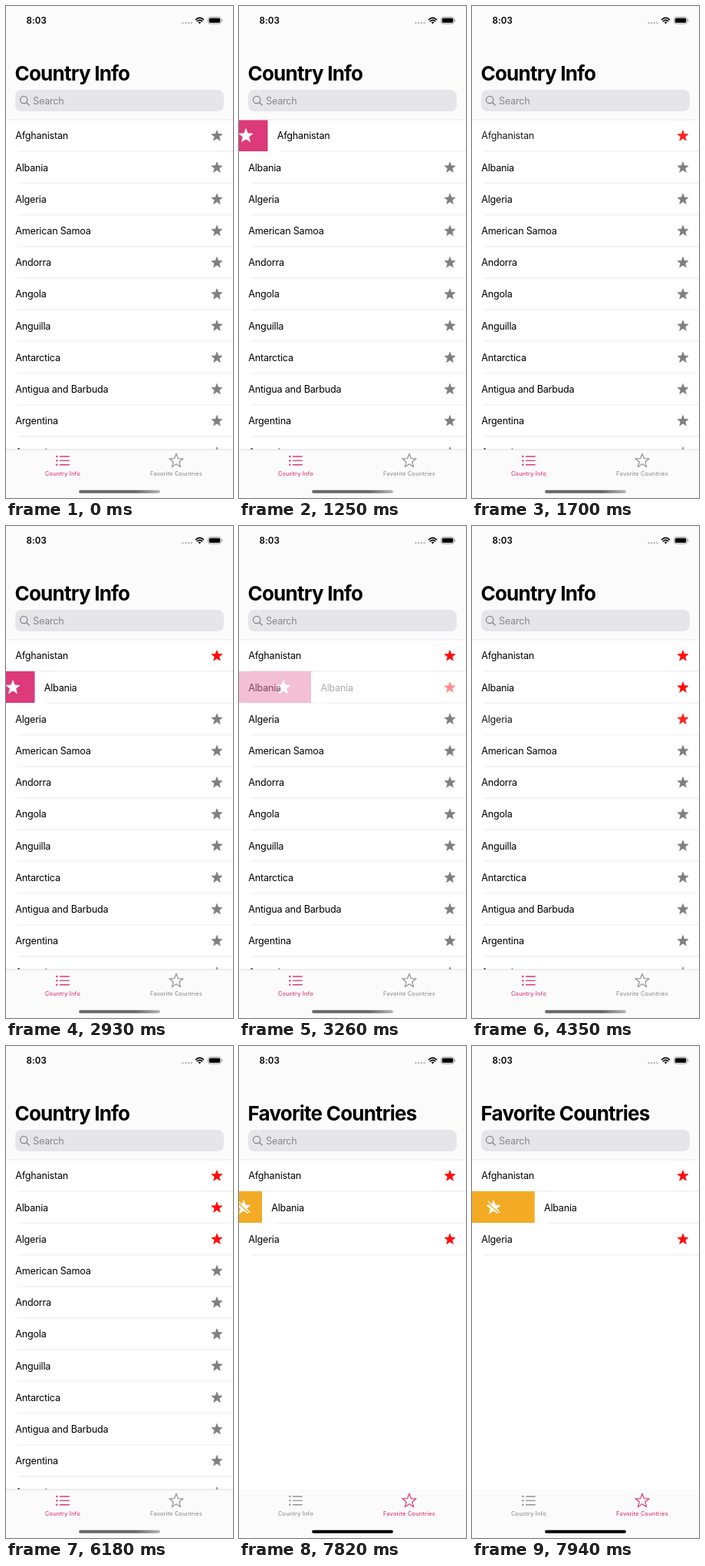
Recreate the animation shown at these times as an HTML page. Size 296 by 640 pixels, loop 8 s.

```html
<!DOCTYPE html>
<html lang="en">
<head>
<meta charset="utf-8">
<title>Country list</title>
<style>
  html, body { margin: 0; width: 100%; height: 100%; overflow: hidden; background: #fff; }
  svg { display: block; overflow: hidden; }
  text { font-family: Inter, Roboto, sans-serif; font-optical-sizing: none; white-space: pre; }
  .row { font-size: 12.6px; letter-spacing: -.2px; }
  .title { font-size: 26px; font-weight: 700; letter-spacing: -.78px; }
  .clock { font-size: 11.5px; font-weight: 600; letter-spacing: .08px; }
  .tab { font-size: 7.3px; font-weight: 500; letter-spacing: .22px; text-anchor: middle; }
</style>
</head>
<body>
<svg id="stage" width="296" height="640" viewBox="0 0 296 640"></svg>
<script>
const LOOP = 8000, TOP = 148, ROW = 41.2;
const PINK = '#dc3a78', AMBER = '#f3ab25', GRAY = '#7f7f7f', DIM = '#939393', RED = '#ff0d0d', LINE = '#e9e9eb';
const NAMES = ['Afghanistan', 'Albania', 'Algeria', 'American Samoa', 'Andorra', 'Angola', 'Anguilla',
  'Antarctica', 'Antigua and Barbuda', 'Argentina', 'Armenia'];

// One swipe: pull the row open, commit, then cross-fade to the updated row.
const pull = (row, favs, at, drags) =>
  drags.map(([x, icon], k) => ({ at: at[k], row, favs, x, icon }));
const settle = (row, favs, t, end) => [
  { at: t, row, favs, x: 94, icon: 58, fade: .32 },
  { at: end, row, favs, soft: true }
];
const FULL = [[37.5, 9], [118, 32], [226, 190]];
const STEPS = [
  { at: 0, favs: 0 },
  ...pull(0, 0, [1250, 1360, 1470], FULL), ...settle(0, 1, 1590, 1700),
  ...pull(1, 1, [2930, 3040, 3150], FULL), ...settle(1, 2, 3260, 3370),
  ...pull(2, 2, [4000, 4120], [[70, 26], [161, 33]]), ...settle(2, 3, 4240, 4350),
  { at: 6180, favs: 3 },
  ...pull(1, 3, [7820, 7940], [[30, 6], [81.7, 28]]).map(s => ({ ...s, saved: true }))
];

const rect = (x, y, w, h, fill, r = 0) =>
  `<rect x="${x}" y="${y}" width="${w}" height="${h}" rx="${r}" fill="${fill}"/>`;
const label = (cls, x, y, str, fill = '#000') =>
  `<text class="${cls}" x="${x}" y="${y}" fill="${fill}">${str}</text>`;
const path = (d, color, w) =>
  `<path d="${d}" fill="none" stroke="${color}" stroke-width="${w}" stroke-linecap="round"/>`;
const group = (body, opacity) => `<g opacity="${opacity}">${body}</g>`;

function star(cx, cy, r, color, hollow) {
  const pts = Array.from({ length: 10 }, (_, k) => {
    const a = (k / 5 - .5) * Math.PI, q = k % 2 ? r * .42 : r;
    return (cx + q * Math.cos(a)).toFixed(2) + ',' + (cy + q * Math.sin(a)).toFixed(2);
  });
  return `<polygon points="${pts.join(' ')}" fill="${hollow ? 'none' : color}" stroke="${color}"
    stroke-width="${hollow ? 1.2 : .8}" stroke-linejoin="round"/>`;
}

function cell(i, x, fav) {
  const y = TOP + i * ROW, mid = y + ROW / 2;
  return rect(x, y + 1, 296, ROW - 1, '#fff')
    + rect(x + 15.5, Math.round(y + ROW) - .5, 296, 1, LINE)
    + label('row', x + 12.2, mid + 4.8, NAMES[i])
    + star(x + 275, mid + .5, 7.3, fav ? RED : GRAY);
}

function action(i, s) {
  const y = TOP + i * ROW, mid = y + ROW / 2 + .2;
  let out = rect(0, Math.round(y), s.x, 41, s.saved ? AMBER : PINK) + star(s.icon, mid + .2, 9.3, '#fff');
  if (s.saved) {
    const slash = (dx, dy) => `M${s.icon - 7.5 + dx} ${mid - 7 + dy}l15 14`;
    out += path(slash(-.2, .5), AMBER, 1.2) + path(slash(.6, -.7), '#fff', 1.2);
  }
  return out;
}

function row(i, s) {
  const fav = i < s.favs;
  if (s.row !== i) return cell(i, 0, fav);
  if (s.soft) return group(cell(i, 0, fav), .9);
  const open = cell(i, s.x, fav) + action(i, s);
  return s.fade ? group(cell(i, 0, fav), 1 - s.fade) + group(open, s.fade) : open;
}

function statusBar() {
  let out = label('clock', 26.6, 23, '8:03');
  for (let k = 0; k < 4; k++) out += `<circle cx="${230.5 + k * 3.7}" cy="22" r="1.2" fill="#b8b8b8"/>`;
  out += path('M247.6 17.6Q252.5 13.2 257.4 17.6M249.4 19.7Q252.5 17 255.6 19.7', '#000', 1.6)
    + '<path d="M250.6 21.3Q252.5 19.8 254.4 21.3L252.5 23.3Z"/>'
    + '<rect x="263.5" y="14.5" width="17" height="8.6" rx="2.6" fill="none" stroke="#9a9a9a" stroke-width=".9"/>'
    + rect(264.8, 15.8, 14.4, 6, '#000', 1.5) + rect(281.4, 17.4, 1.1, 2.8, '#9a9a9a', .5);
  return out;
}

function header(title) {
  return rect(0, 0, 296, TOP, '#fbfbfb') + rect(0, TOP - .5, 296, 1, LINE) + statusBar()
    + label('title', 11.5, 97, title)
    + rect(12, 109, 272, 28, '#e6e6ea', 8)
    + '<circle cx="23.2" cy="122" r="4.7" fill="none" stroke="#818186" stroke-width="1.2"/>'
    + path('M26.7 125.5L30.2 129', '#818186', 1.3)
    + label('row', 35, 127.8, 'Search', '#86868b');
}

function tabBar(saved) {
  const a = saved ? DIM : PINK, b = saved ? PINK : DIM;
  let out = rect(0, 577, 296, 63, '#fbfbfb');
  if (!saved) out += rect(0, 576.5, 296, 1, '#dcdcde');
  for (const y of [586, 591.4, 596.8])
    out += `<circle cx="66.3" cy="${y}" r="1.2" fill="${a}"/>` + path(`M70.5 ${y}H82.2`, a, 1.4);
  return out + star(222, 591.8, 9.6, b, true)
    + label('tab', 74, 611, 'Country Info', a)
    + label('tab', 222, 611, 'Favorite Countries', b)
    + '<linearGradient id="fade"><stop offset=".7" stop-color="#666"/><stop offset="1" stop-color="#b5b5b5"/></linearGradient>'
    + rect(95.1, 629.8, 105.8, 3.9, saved ? '#000' : 'url(#fade)', 1.95);
}

function screen(s) {
  const names = s.saved ? NAMES.slice(0, s.favs) : NAMES;
  return rect(0, 0, 296, 640, '#fff')
    + names.map((_, i) => row(i, s)).join('')
    + header(s.saved ? 'Favorite Countries' : 'Country Info')
    + tabBar(s.saved);
}

const stage = document.getElementById('stage');
const start = performance.now();
let shown;

function tick(now) {
  const t = Math.max(0, now - start) % LOOP;
  const step = STEPS.findLast(s => s.at <= t);
  if (step !== shown) stage.innerHTML = screen(shown = step);
  requestAnimationFrame(tick);
}
tick(start);
</script>
</body>
</html>
```
